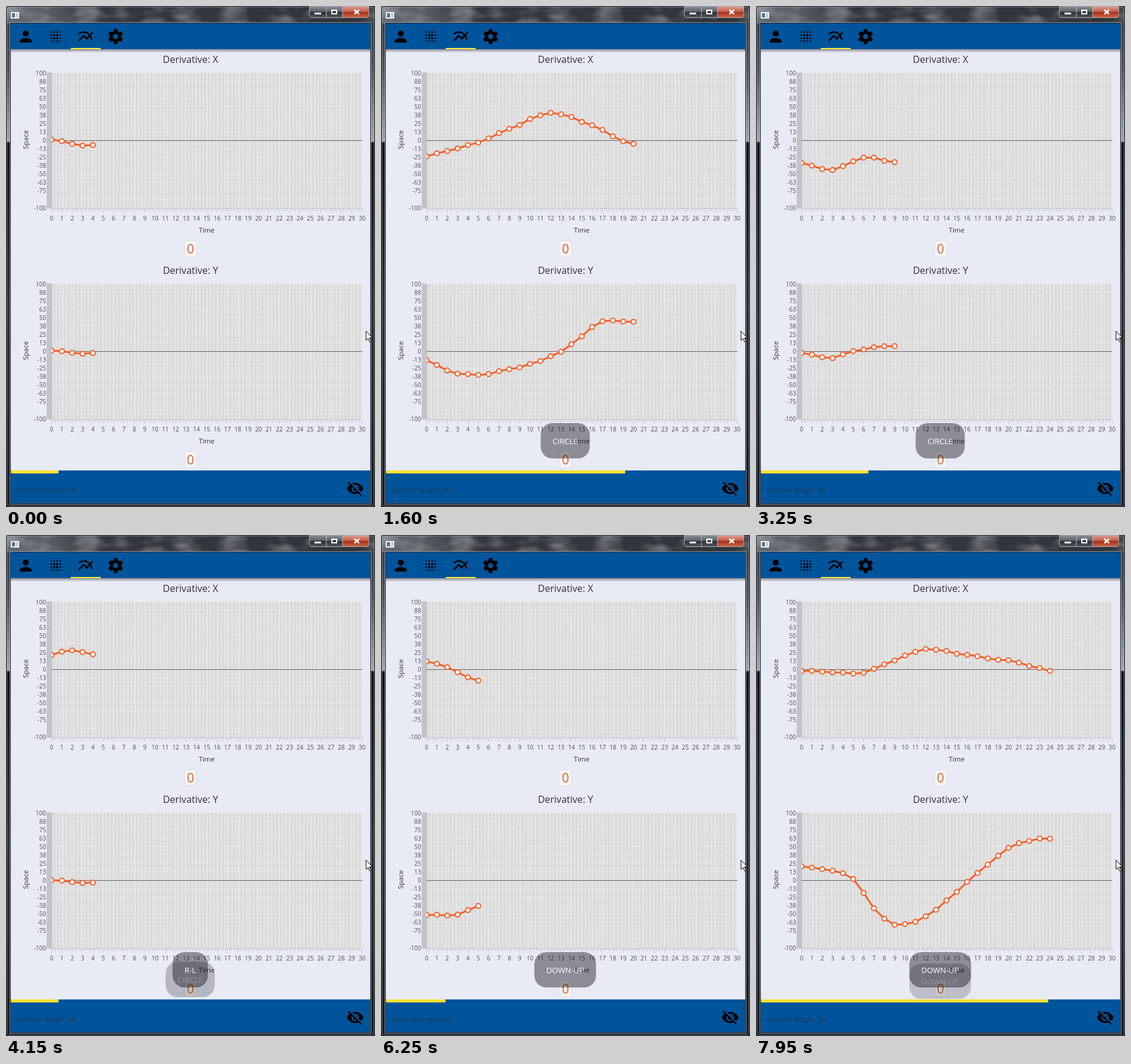
Write an HTML page that moves like this. It is 616 px wide and 836 px high and loops after 8000 ms.

```html
<!DOCTYPE html>
<html lang="en">
<head>
<meta charset="utf-8">
<title>Derivative charts</title>
<style>
  html, body { margin: 0; width: 100%; height: 100%; overflow: hidden; background: #e8eaf6; }
  svg { display: block; width: 616px; height: 836px; font-family: "Open Sans", "Noto Sans", sans-serif; }
  .crisp { shape-rendering: crispEdges; }
  .label { font-size: 10px; fill: #50505c; }
  .axis { font-size: 11.5px; fill: #333; }
  .title { font-size: 16px; fill: #333; }
  .grid { stroke: #f4f4f4; stroke-dasharray: 3 3; }
  .series { fill: none; stroke: #f3622d; stroke-width: 3; stroke-linejoin: round; }
  .dot { fill: #fff; stroke: #f3622d; stroke-width: 2; }
  .toast rect { fill: #080812; fill-opacity: .41; }
  .toast text { font-size: 13px; fill: #fff; }
</style>
</head>
<body>
<svg id="stage" viewBox="0 0 616 836">
  <defs>
    <linearGradient id="glass">
      <stop offset="0" stop-color="#666a72"/><stop offset=".1" stop-color="#5c6068"/>
      <stop offset=".25" stop-color="#34373e"/><stop offset="1" stop-color="#30343b"/>
    </linearGradient>
    <linearGradient id="side" x2="0" y2="1">
      <stop offset="0" stop-color="#343941"/><stop offset=".12" stop-color="#4d535d"/>
      <stop offset=".27" stop-color="#a3a8b1"/><stop offset=".273" stop-color="#10141b"/>
      <stop offset=".6" stop-color="#29313d"/><stop offset="1" stop-color="#191e26"/>
    </linearGradient>
    <linearGradient id="shade" x2="0" y2="1">
      <stop offset="0" stop-color="#000" stop-opacity=".4"/><stop offset="1" stop-color="#000" stop-opacity="0"/>
    </linearGradient>
    <linearGradient id="button" x2="0" y2="1">
      <stop offset="0" stop-color="#8b8f96"/><stop offset=".48" stop-color="#5b5f67"/>
      <stop offset=".5" stop-color="#292c33"/><stop offset="1" stop-color="#545861"/>
    </linearGradient>
    <linearGradient id="close" x2="0" y2="1">
      <stop offset="0" stop-color="#dda093"/><stop offset=".48" stop-color="#c25c48"/>
      <stop offset=".5" stop-color="#a52d17"/><stop offset="1" stop-color="#cb6947"/>
    </linearGradient>
    <filter id="smoke" x="0" y="0" width="1" height="1">
      <feTurbulence type="fractalNoise" baseFrequency=".025 .05" numOctaves="2" seed="4"/>
      <feColorMatrix values="0 0 0 0 .65  0 0 0 0 .67  0 0 0 0 .7  2 0 0 0 -.8"/>
    </filter>
    <pattern id="stripes" x="76" width="6" height="6" patternUnits="userSpaceOnUse">
      <rect width="6" height="6" fill="#dadada"/><rect width="3" height="6" fill="#e2e2e2"/>
    </pattern>
    <clipPath id="plot"><rect x="76" y="-125" width="526" height="250"/></clipPath>
  </defs>

  <rect width="616" height="836" fill="url(#side)"/>
  <rect width="616" height="29" fill="url(#glass)"/>
  <rect width="616" height="29" filter="url(#smoke)" opacity=".5"/>
  <rect x=".5" y=".5" width="615" height="835" rx="5" fill="none" stroke="#14171c"/>
  <rect x="1.5" y="1.5" width="613" height="833" rx="4" fill="none" stroke="#a4aab3" stroke-opacity=".6"/>
  <rect x="6.5" y="27.5" width="603" height="804" fill="none" stroke="#b2b8c1" stroke-opacity=".7"/>
  <rect x="7.5" y="28.5" width="601" height="802" fill="#e8eaf6" stroke="#20252c"/>
  <g class="crisp">
    <rect x="8" y="10" width="14" height="11" fill="#eef1f5"/>
    <rect x="10" y="12" width="5" height="7" fill="#4e7391"/>
    <rect x="17" y="12" width="3" height="7" fill="#b9c3cd"/>
  </g>
  <g stroke="#b5b9c0" stroke-opacity=".8">
    <path d="M506.500 .5H535V19.500H511q-4.500 0-4.500-4.500z" fill="url(#button)"/>
    <path d="M535 .5H562V19.500H535z" fill="url(#button)"/>
    <path d="M562 .5H605.500V15q0 4.500-4.500 4.500H562z" fill="url(#close)"/>
  </g>
  <path class="crisp" d="M515 11h11v3h-11z" fill="#fff"/>
  <rect x="544" y="7" width="8" height="6" fill="none" stroke="#fff" stroke-width="2"/>
  <path d="M581.500 6.500l8 7M589.500 6.500l-8 7" stroke="#fff" stroke-width="2.600"/>

  <rect x="8" y="72" width="600" height="6" fill="url(#shade)"/>
  <rect x="8" y="29" width="600" height="43" fill="#00549b"/>
  <rect x="108" y="70" width="50" height="2" fill="#ffeb3b"/>
  <path transform="translate(18 36) scale(1.250)" d="M12 12c2.210 0 4-1.790 4-4s-1.790-4-4-4-4 1.790-4 4 1.790 4 4 4zm0 2c-2.670 0-8 1.340-8 4v2h16v-2c0-2.660-5.330-4-8-4z"/>
  <g id="blur" transform="translate(83 51) scale(1.250)"></g>
  <path transform="translate(118 36) scale(1.250)" d="M22 6.920l-1.410-1.410-2.850 3.210C15.680 6.400 12.830 5 9.610 5 6.720 5 4.070 6.160 2 8l1.420 1.420C5.120 7.930 7.270 7 9.610 7c2.740 0 5.090 1.260 6.770 3.240l-2.880 3.240-4-4L2 16.990l1.500 1.500 6-6.010 4 4 4.050-4.550c.75 1.350 1.250 2.900 1.440 4.550H21c-.22-2.300-.95-4.390-2.040-6.140z"/>
  <g id="gear" transform="translate(183 51)"><circle r="6.800" fill="none" stroke="#000" stroke-width="4.800"/></g>

  <g id="charts"></g>

  <rect x="8" y="775" width="600" height="55" fill="#00549b"/>
  <rect id="bar" x="8" y="775" height="5" rx="2" fill="#f9e22f"/>
  <text x="18" y="812" font-size="11.500" fill="#26384d">Gesture length: 30</text>
  <path transform="translate(568 790) scale(1.250)" d="M12 7c2.760 0 5 2.240 5 5 0 .65-.13 1.260-.36 1.830l2.920 2.920c1.510-1.260 2.700-2.890 3.430-4.750-1.730-4.390-6-7.500-11-7.500-1.400 0-2.740.25-3.980.7l2.160 2.160C10.740 7.130 11.350 7 12 7zM2 4.270l2.280 2.280.46.46C3.080 8.300 1.780 10.020 1 12c1.730 4.390 6 7.500 11 7.500 1.550 0 3.030-.3 4.380-.84l.42.42L19.730 22 21 20.730 3.270 3 2 4.270zM7.530 9.800l1.550 1.550c-.05.21-.08.43-.08.65 0 1.660 1.340 3 3 3 .22 0 .44-.03.65-.08l1.550 1.550c-.67.33-1.410.53-2.200.53-2.760 0-5-2.240-5-5 0-.79.2-1.530.53-2.200zm4.310-.78l3.150 3.150.02-.16c0-1.660-1.340-3-3-3z"/>
  <g id="toasts"></g>
  <path d="M601 542.500v15.500l3.500-3.300 2.600 6 2.300-1-2.500-5.900h4.800z" fill="#fff" stroke="#000"/>
</svg>
<script>
const LOOP = 8000, TICK = 50, RATE = 0.0292, LAST = 30;
const LEFT = 76, STEP = 17.28, HALF = 112.5;
const $ = id => document.getElementById(id);

function add(parent, tag, attrs, text) {
  const el = document.createElementNS("http://www.w3.org/2000/svg", tag);
  for (const key in attrs) el.setAttribute(key, attrs[key]);
  if (text !== undefined) el.textContent = text;
  return parent.appendChild(el);
}

// Turning points of each gesture as [time step, height]; a smooth curve runs through them.
const gestures = [
  { start: -154, x: [[0, 1], [4, -9], [17, 46], [30, -25]], y: [[0, 1], [4, -4], [17, 40], [30, -15]] },
  { start: 898,
    x: [[0, -27], [4, -9], [8, 18], [12, 46], [16, 24], [20, -7], [30, -40]],
    y: [[0, -15], [3, -38], [8, -31], [13, 0], [17, 49], [20, 48], [30, 28]] },
  { start: 1904, x: [[0, -40], [15, 73], [30, -38]], y: [[0, 26], [8, -42], [22, 38], [30, 0]] },
  { start: 2925,
    x: [[0, -38], [3, -50], [6, -28], [9, -36], [24, 45], [30, 26]],
    y: [[0, -3], [3, -12], [5, 1], [9, 9], [18, 28], [30, 0]] },
  { start: 4001, x: [[0, 24], [2, 31], [4, 24], [18, -15], [30, 4]], y: [[0, 0], [4, -5], [18, 18], [30, -14]] },
  { start: 5028, x: [[0, 4], [6, 6], [18, 2], [30, 12]], y: [[0, -14], [3, -2], [6, 30], [12, 50], [30, -58]] },
  { start: 6062, x: [[0, 13], [2, 3], [5, -18], [20, 20], [30, -3]], y: [[0, -58], [3, -58], [5, -42], [20, 58], [30, 23]] },
  { start: 7111,
    x: [[0, -3], [6, -5], [9, 15], [12, 34], [16, 23], [20, 14], [24, -2], [30, -10]],
    y: [[0, 23], [5, 3], [7, -48], [9, -74], [12, -60], [16, -4], [20, 53], [24, 70], [30, 60]] }
];

// Cubic Hermite curve with a light, fixed jitter.
function sample(points, i) {
  const k = Math.max(0, points.findIndex(p => p[0] >= i) - 1);
  const slope = n => {
    const [x0, y0] = points[Math.max(0, n - 1)], [x1, y1] = points[Math.min(points.length - 1, n + 1)];
    return (y1 - y0) / (x1 - x0);
  };
  const [xa, ya] = points[k], [xb, yb] = points[k + 1];
  const span = xb - xa, u = (i - xa) / span, v = 1 - u;
  return ya * v * v * (1 + 2 * u) + yb * u * u * (3 - 2 * u)
    + span * u * v * (slope(k) * v - slope(k + 1) * u) + Math.sin(i * i * 1.7);
}

function buildChart(name, zero) {
  const g = add($("charts"), "g", { transform: `translate(0 ${zero})` });
  const text = (x, y, cls, value, anchor = "middle") =>
    add(g, "text", { x, y, class: cls, "text-anchor": anchor }, value);
  const line = (d, attrs) => add(g, "path", { d, class: "crisp", fill: "none", ...attrs });

  text(308, -129, "title", "Derivative: " + name);
  add(g, "rect", { x: LEFT, y: -113, width: 519, height: 226, fill: "url(#stripes)" });
  let grid = "", ticks = "";
  for (let i = 0; i <= LAST; i++) grid += `M${LEFT + i * STEP} 113V-113`;
  for (let i = -8; i <= 8; i++) grid += `M${LEFT} ${i * HALF / 8}H595`;
  for (let i = 0; i <= LAST * 5; i++) ticks += `M${LEFT + i * STEP / 5} 113v${i % 5 ? 5 : 8}`;
  line(grid, { class: "grid crisp" });
  add(g, "rect", { x: 68, y: -113, width: 9, height: 226, fill: "#c2c2ca" });
  line(ticks + "M68 113H595", { stroke: "#bfc0c9" });
  line(`M${LEFT} .5H595`, { stroke: "#666" });

  for (let i = -8; i <= 8; i++) {
    const value = Math.sign(i) * Math.round(Math.abs(i) * 12.5);
    if (i !== -7) text(67, 4 - i * HALF / 8, "label", value, "end");
  }
  for (let i = 0; i <= LAST; i++) text(LEFT + i * STEP, 134, "label", i);
  text(335, 154, "axis", "Time");
  add(g, "text", { transform: "translate(37 -1) rotate(-90)", class: "axis", "text-anchor": "middle" }, "Space");
  add(g, "rect", { x: 298, y: 167.5, width: 20, height: 27, rx: 2, fill: "#f4f4f4", stroke: "#dedfe5" });
  add(g, "text", { x: 308, y: 188.5, "text-anchor": "middle", "font-size": 21, fill: "#e0622f" }, "0");

  const plot = add(g, "g", { "clip-path": "url(#plot)" });
  const path = add(plot, "path", { class: "series" });
  const dots = Array.from({ length: LAST + 1 }, (_, i) =>
    add(plot, "circle", { class: "dot", r: 4, cx: LEFT + i * STEP }));
  return (points, count) => {
    const heights = dots.map((_, i) => -sample(points, i));
    dots.forEach((dot, i) => {
      dot.setAttribute("cy", heights[i]);
      dot.style.display = i <= count ? "" : "none";
    });
    path.setAttribute("d", "M" + heights.slice(0, count + 1).map((y, i) => `${LEFT + i * STEP} ${y}`).join("L"));
  };
}

const toasts = [
  ["CIRCLE", 890, 2920],
  ["CIRCLE", 2920, 3950],
  ["R-L", 3950, 5900],
  ["DOWN-UP", 6040, 7732],
  ["DOWN-UP", 7732, 9000]
].map(([label, from, to]) => {
  const g = add($("toasts"), "g", { class: "toast" });
  const box = add(g, "rect", { y: 696, height: 59, rx: 20 });
  const text = add(g, "text", { x: 307.5, y: 730.5, "text-anchor": "middle" }, label);
  const width = Math.round(text.getComputedTextLength()) + 40;
  box.setAttribute("x", 307.5 - width / 2);
  box.setAttribute("width", width);
  return { g, from, to };
});

function showToast({ g, from, to }, t) {
  const clamp = v => Math.min(1, Math.max(0, v));
  const enter = clamp((t - from) / 200), leave = clamp((t - to) / 300);
  g.setAttribute("transform", `translate(0 ${44 * (1 - enter) ** 2 + 36 * leave ** 2})`);
  g.setAttribute("opacity", enter * (1 - leave ** 2));
}

const offsets = [-9, -6, -2, 2, 6, 9];
for (const cx of offsets) for (const cy of offsets) {
  const near = Math.min(Math.abs(cx), Math.abs(cy)), far = Math.max(Math.abs(cx), Math.abs(cy));
  if (far < 9 || near === 2) add($("blur"), "circle", { cx, cy, r: far === 9 ? 0.5 : far === 6 ? 1 : 1.5 });
}
for (let i = 0; i < 6; i++) {
  add($("gear"), "path", { d: "M-4-8L-2.500-12.500H2.500L4-8z", transform: `rotate(${i * 60})` });
}

const drawX = buildChart("X", 224), drawY = buildChart("Y", 576);
const origin = performance.now();

function frame() {
  const elapsed = (performance.now() - origin) % LOOP;
  const t = Math.floor(elapsed / TICK) * TICK;
  const gesture = gestures.filter(g => g.start <= t).pop();
  const count = Math.min(LAST, Math.floor((t - gesture.start) * RATE));
  drawX(gesture.x, count);
  drawY(gesture.y, count);
  $("bar").setAttribute("width", count * 20);
  toasts.forEach(toast => showToast(toast, t));
  requestAnimationFrame(frame);
}
frame();
</script>
</body>
</html>
```
